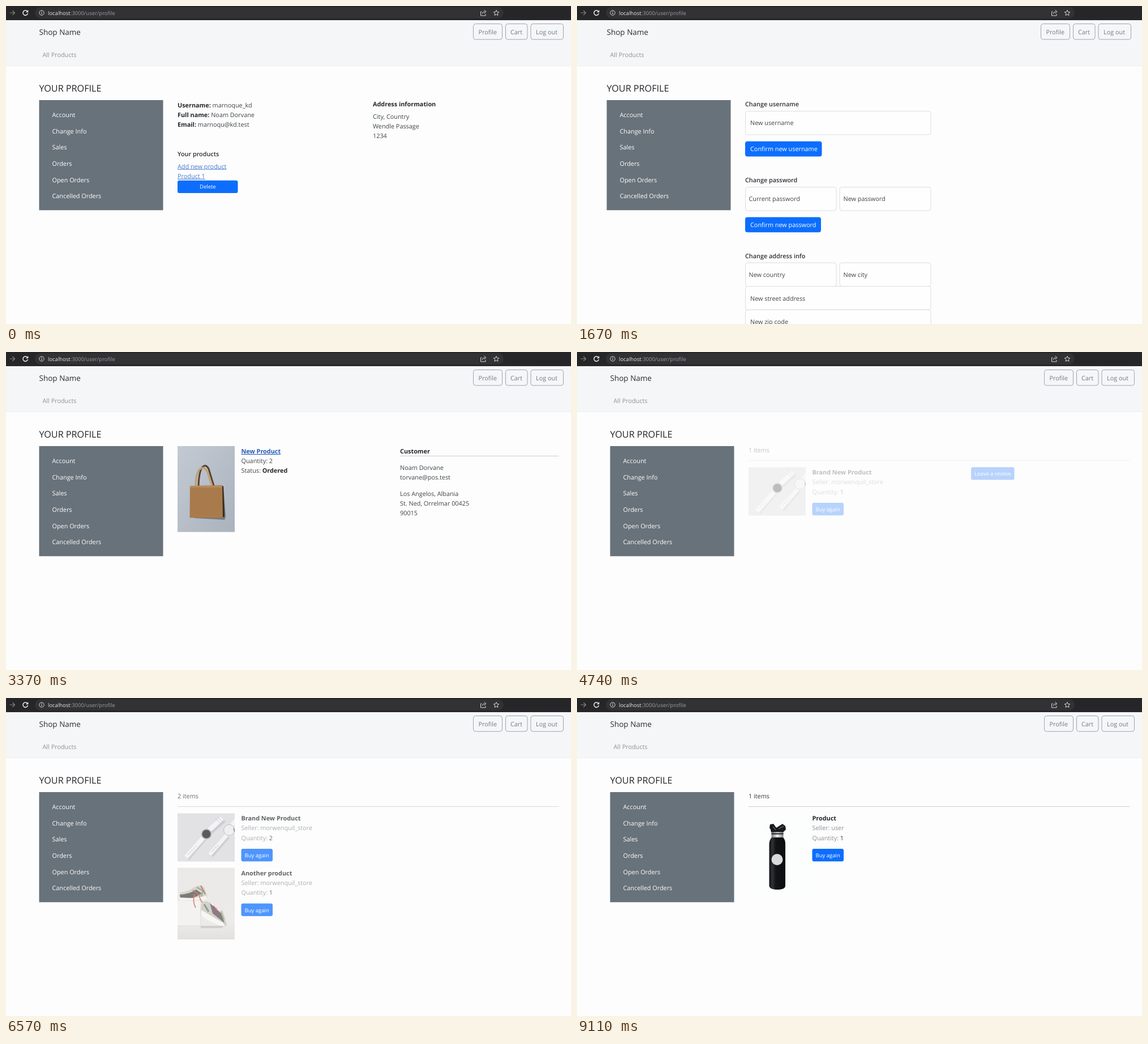
An HTML page for the animation above (9.64 s loop, 998 by 561 pixels).

```html
<!DOCTYPE html>
<html lang="en">
<head>
<meta charset="utf-8">
<title>Shop profile</title>
<style>
html, body { margin: 0; width: 100%; height: 100%; overflow: hidden; background: #fdfdfd; }
svg { display: block; width: 998px; height: 561px; }
text { font: 400 10.85px "Open Sans", "Noto Sans", sans-serif; fill: #3f4347; text-rendering: geometricPrecision; }
.bold, .bold text { font-weight: 700; fill: #24282c; }
.head { font-weight: 600; fill: #2b2f33; }
.title { font-size: 16.2px; font-weight: 500; fill: #212529; }
.brand { font-size: 13.5px; fill: #2b2d2f; }
.url { font-size: 9.47px; fill: #e6e6e6; }
.dim { fill: #9b9ca0; }
.soft { fill: #8d9195; }
.dark { fill: #33373b; }
.nav text { fill: #747a80; }
.nav rect { fill: none; stroke: #a0a4b2; }
.menu text { fill: #fff; }
.link { fill: #4a7bd0; text-decoration: underline; }
.blue { fill: #0d6efd; }
.small { font-size: 9.5px; fill: #fff; }
.big { fill: #fff; }
.field { fill: #fefefe; stroke: #dddde4; }
.rule { stroke: #cdcbd6; }
.icon { fill: none; stroke: #d8d8d8; stroke-width: 1.2; }

.page, .shift { animation: 9640ms linear infinite; }
.page { opacity: 0; }
.shift { animation-name: shift; animation-timing-function: step-end; }
.account { animation-name: account; }
.change { animation-name: change; }
.sales { animation-name: sales; }
.orders { animation-name: orders; }
.open { animation-name: open; }
.cancelled { animation-name: cancelled; }

/* the scrollbar of the long page moves the layout left */
@keyframes shift {
  0%, 30.083%, 100% { transform: none; }
  13.174% { transform: translateX(-6px); }
}
@keyframes account {
  0%, 13.172% { opacity: 1; }
  13.174%, 100% { opacity: 0; }
}
@keyframes change {
  0%, 13.172% { opacity: 0; }
  13.174% { opacity: .28; }
  14.315%, 30.081% { opacity: 1; }
  30.083%, 100% { opacity: 0; }
}
@keyframes sales {
  0%, 30.081% { opacity: 0; }
  30.083% { opacity: .28; }
  31.224%, 49.168% { opacity: 1; }
  49.17%, 100% { opacity: 0; }
}
@keyframes orders {
  0%, 49.168% { opacity: 0; }
  49.17% { opacity: .28; }
  50.311%, 67.529% { opacity: 1; }
  67.531%, 100% { opacity: 0; }
}
@keyframes open {
  0%, 67.529% { opacity: 0; }
  67.531% { opacity: .4; }
  68.672%, 83.4% { opacity: 1; }
  83.402%, 100% { opacity: 0; }
}
@keyframes cancelled {
  0%, 83.4% { opacity: 0; }
  83.402% { opacity: .28; }
  84.543%, 100% { opacity: 1; }
}
</style>
</head>
<body>
<svg viewBox="0 0 998 561">
  <defs>
    <linearGradient id="wall" x2="1" y2="1">
      <stop stop-color="#c3cad3"/><stop offset="1" stop-color="#aab2bd"/>
    </linearGradient>
    <linearGradient id="studio" x2="0" y2="1">
      <stop stop-color="#e3e1df"/><stop offset=".75" stop-color="#e6e4e2"/><stop offset="1" stop-color="#d8d6d5"/>
    </linearGradient>
    <linearGradient id="steel">
      <stop stop-color="#77797c"/><stop offset=".5" stop-color="#eceded"/><stop offset="1" stop-color="#808286"/>
    </linearGradient>
    <linearGradient id="black">
      <stop stop-color="#101113"/><stop offset=".2" stop-color="#303236"/><stop offset=".4" stop-color="#131416"/><stop offset="1" stop-color="#0b0c0d"/>
    </linearGradient>
    <clipPath id="frame"><path d="M303 203.500h101v85H303z"/></clipPath>

    <g id="watches" clip-path="url(#frame)">
      <path d="M303 203h101v86H303z" fill="#d7d6d9"/>
      <g fill="none" stroke-linecap="butt">
        <path d="M320 283L350 248M360 237L385 215" stroke="#bcbbc0" stroke-width="9"/>
        <path d="M318 281L349 246M359 233L382 212" stroke="#f0eff2" stroke-width="8"/>
        <path d="M322 276L336 261" stroke="#a9a8ae" stroke-width="1.500" stroke-dasharray="1.500 3"/>
        <path d="M370 213l10 9M374 210l9 9" stroke="#b3b2b8"/>
        <path d="M363 278L392 244" stroke="#bcbbc0" stroke-width="8"/>
        <path d="M360 276L390 242M399 224L406 216" stroke="#efeef1" stroke-width="7"/>
        <path d="M364 271L376 258" stroke="#98979d" stroke-width="1.500" stroke-dasharray="1.500 3"/>
      </g>
      <circle cx="354" cy="240" r="9.500" fill="#aaa9ae"/>
      <circle cx="354" cy="240" r="7.600" fill="#1d1e21"/>
      <circle cx="394" cy="233" r="9.500" fill="#e9e8eb" stroke="#a9a8ad"/>
      <path d="M402 230l2 6" stroke="#55555a" stroke-width="1.500"/>
    </g>

    <g id="shoes">
      <path d="M303 299.500h101V426H303z" fill="url(#studio)"/>
      <path d="M303 358h41v44h-41z" fill="#efeeec"/>
      <path d="M303 402h41v-44" fill="none" stroke="#d0cecb"/>
      <path d="M344 402h44l-8 4h-36z" fill="#bfbcb9"/>
      <path d="M306 349L308 343Q321 342 332 334Q344 328 350 334L354 345Q357 353 352 355L309 356Z" fill="#c9c5b5"/>
      <path d="M307 347Q324 346 336 338L346 345L330 353L308 352Z" fill="#4b4a43"/>
      <path d="M306 352Q330 355 354 349L354 355L309 357Z" fill="#f4f2ee"/>
      <path d="M337 334l11 6l-3 10" fill="none" stroke="#7d9a80" stroke-width="3"/>
      <path d="M330 339l12 9M344 331l8 15" stroke="#a94f58" stroke-width="2"/>
      <path d="M333 346Q329 359 335 370M341 346Q343 361 351 363Q362 365 373 372" fill="none" stroke="#d55443" stroke-width="1.600"/>
      <path d="M346 361Q355 355 362 363L378 377Q381 372 383 376L390 399Q389 404 382 402L346 383Q342 374 346 361Z" fill="#c5c1b4"/>
      <path d="M360 362L380 380L386 397L365 380Z" fill="#55505a"/>
      <path d="M345 374L384 397L387 403Q366 400 345 384Z" fill="#f5f3ef"/>
      <path d="M350 364l8 13" stroke="#5f7c68" stroke-width="3"/>
      <path d="M366 367l10 17" stroke="#8e3850" stroke-width="3"/>
      <path d="M380 377l5 14" stroke="#83a46c" stroke-width="2"/>
    </g>

    <g id="again">
      <rect class="blue" x="415.500" y="266" width="55.500" height="22.300" rx="3"/>
      <text class="small" x="421.500" y="281.300">Buy again</text>
    </g>
  </defs>

  <path d="M0 0h998v561H0z" fill="#fdfdfd"/>

  <path d="M0 0h998v25H0z" fill="#262628"/>
  <rect x="51" y="2" width="828" height="20" rx="10" fill="#323235"/>
  <path class="icon" d="M6.500 12h9M11.500 8l4 4l-4 4" style="stroke:#85857a"/>
  <path class="icon" d="M37.600 9.300A4.300 4.300 0 1 0 38.500 13" style="stroke:#eee;stroke-width:1.500"/>
  <path d="M39.300 7v4.300H35z" fill="#eee"/>
  <circle class="icon" cx="63" cy="12" r="4.200" style="stroke-width:1"/>
  <path class="icon" d="M63 11.500v2.800M63 9.300v1.100"/>
  <text class="url" x="74" y="15.500">localhost<tspan class="dim">:3000/user/profile</tspan></text>
  <path class="icon" d="M840.500 10h-2v7h8.500v-3M841 14q.5-4 5-4M844.500 7l3.500 3l-3.500 3" style="stroke-width:1"/>
  <path class="icon" d="M866 7.300l1.400 3.200l3.400.3l-2.600 2.300l.8 3.400l-3-1.800l-3 1.800l.8-3.400l-2.600-2.300l3.400-.3z" style="stroke-width:1"/>

  <path d="M0 25h998v80H0z" fill="#f5f6f7"/>
  <path d="M0 105.500h998" stroke="#ededee"/>

  <g class="shift">
    <text class="brand" x="58.500" y="51">Shop Name</text>
    <text class="soft" x="64.500" y="90">All Products</text>
    <g class="nav">
      <rect x="825.500" y="31.500" width="51" height="27.500" rx="4"/>
      <rect x="882.500" y="31.500" width="38.500" height="27.500" rx="4"/>
      <rect x="927" y="31.500" width="57.500" height="27.500" rx="4"/>
      <text x="834.500" y="50">Profile</text>
      <text x="891" y="50">Cart</text>
      <text x="936" y="50">Log out</text>
    </g>
    <text class="title" x="58.500" y="151">YOUR PROFILE</text>
    <g class="menu">
      <path d="M58.500 166h219v194.300h-219z" fill="#68727a"/>
      <text x="81.500" y="196">Account</text>
      <text x="81.500" y="224.700">Change Info</text>
      <text x="81.500" y="253.300">Sales</text>
      <text x="81.500" y="282">Orders</text>
      <text x="81.500" y="310.600">Open Orders</text>
      <text x="81.500" y="339.200">Cancelled Orders</text>
    </g>
  </g>

  <g class="page account">
    <text x="303" y="179"><tspan class="bold">Username:</tspan> marnoque_kd</text>
    <text x="303" y="196.200"><tspan class="bold">Full name:</tspan> Noam Dorvane</text>
    <text x="303" y="213.400"><tspan class="bold">Email:</tspan> marnoqu@kd.test</text>
    <text class="head" x="303" y="265.200">Your products</text>
    <text class="link" x="303" y="286.600">Add new product</text>
    <text class="link" x="303" y="303.800">Product 1</text>
    <rect class="blue" x="303" y="307.700" width="106.500" height="22.300" rx="3"/>
    <text class="small" x="342" y="322.400">Delete</text>
    <text class="bold" x="648" y="177.300">Address information</text>
    <text x="648" y="198.700">City, Country</text>
    <text x="648" y="215.900">Wendle Passage</text>
    <text x="648" y="233.100">1234</text>
  </g>

  <g class="page change">
    <text class="head" x="297" y="177.300">Change username</text>
    <rect class="field" x="297.500" y="185.500" width="327.500" height="41.500" rx="4"/>
    <text x="306" y="210.400">New username</text>
    <rect class="blue" x="297" y="238.700" width="135.500" height="26.800" rx="4"/>
    <text class="big" x="306" y="256.200">Confirm new username</text>

    <text class="head" x="297" y="311.200">Change password</text>
    <rect class="field" x="297.500" y="319.500" width="160.500" height="41.500" rx="4"/>
    <rect class="field" x="464" y="319.500" width="161" height="41.500" rx="4"/>
    <text x="303.500" y="344.200">Current password</text>
    <text x="470.500" y="344.200">New password</text>
    <rect class="blue" x="297" y="372.500" width="134" height="26.800" rx="4"/>
    <text class="big" x="306" y="390">Confirm new password</text>

    <text class="head" x="297" y="445">Change address info</text>
    <rect class="field" x="297.500" y="453" width="160.500" height="41.500" rx="4"/>
    <rect class="field" x="464" y="453" width="161" height="41.500" rx="4"/>
    <rect class="field" x="297.500" y="494.500" width="327.500" height="41.500" rx="4"/>
    <rect class="field" x="297.500" y="536" width="327.500" height="41.500" rx="4"/>
    <text x="303.500" y="478.200">New country</text>
    <text x="470.500" y="478.200">New city</text>
    <text x="306" y="519.800">New street address</text>
    <text x="306" y="561">New zip code</text>
  </g>

  <g class="page sales">
    <path d="M303 166h101v151.500H303z" fill="url(#wall)"/>
    <path d="M332 293L386 296L388 291L384 236z" fill="#77797d"/>
    <path d="M340 236Q341 210 347 203Q353 197 358 206L367 236" fill="none" stroke="#54432f" stroke-width="3"/>
    <path d="M335 236Q336 213 342 207Q350 200 356 212L364 236" fill="none" stroke="#c0a178" stroke-width="3.500"/>
    <path d="M380 235L384 237L386 290L381 293z" fill="#33291f"/>
    <path d="M325 236L382 235L383 292.500L324.500 292.500z" fill="#a97b4c"/>
    <path d="M325 236h57v3h-57z" fill="#b98c5d"/>
    <text class="link bold" x="415.500" y="179" style="fill:#2257b8">New Product</text>
    <text x="415.500" y="196.200">Quantity: 2</text>
    <text x="415.500" y="213.400">Status: <tspan class="bold">Ordered</tspan></text>
    <text class="bold" x="696" y="179">Customer</text>
    <path class="rule" d="M696 183.500h280.500"/>
    <text x="696" y="208">Noam Dorvane</text>
    <text x="696" y="225.200">torvane@pos.test</text>
    <text x="696" y="254">Los Angelos, Albania</text>
    <text x="696" y="271.200">St. Ned, Orrelmar 00425</text>
    <text x="696" y="288.400">90015</text>
  </g>

  <g class="page orders">
    <text class="dark" x="303" y="177.300">1 items</text>
    <path class="rule" d="M303 191.500h673.500"/>
    <use href="#watches"/>
    <text class="bold" x="415.500" y="216.200">Brand New Product</text>
    <text class="soft" x="415.500" y="233.400">Seller: morwenquil_store</text>
    <text class="soft" x="415.500" y="250.600">Quantity: <tspan class="dark">1</tspan></text>
    <use href="#again"/>
    <rect class="blue" x="696" y="203.300" width="76.500" height="22.300" rx="3"/>
    <text class="small" x="702" y="218.400">Leave a review</text>
  </g>

  <g class="page open">
    <text class="dark" x="303" y="177.300">2 items</text>
    <path class="rule" d="M303 191.500h673.500"/>
    <use href="#watches"/>
    <text class="bold" x="415.500" y="216.200">Brand New Product</text>
    <text class="soft" x="415.500" y="233.400">Seller: morwenquil_store</text>
    <text class="soft" x="415.500" y="250.600">Quantity: <tspan class="dark">2</tspan></text>
    <use href="#again"/>
    <use href="#shoes"/>
    <text class="bold" x="415.500" y="312.800">Another product</text>
    <text class="soft" x="415.500" y="330">Seller: morwenquil_store</text>
    <text class="soft" x="415.500" y="347.200">Quantity: <tspan class="dark">1</tspan></text>
    <use href="#again" y="96.500"/>
  </g>

  <g class="page cancelled">
    <text class="dark" x="303" y="177.300">1 items</text>
    <path class="rule" d="M303 191.500h673.500"/>
    <path d="M303 203.500h101v151H303z" fill="#fcfdfd"/>
    <path d="M343 237L342 232L340 229L341 223L347 222L352 229L363 222L368 226L369 232L364 237z" fill="#17181a"/>
    <path d="M346 227l5 6M356 231l9-5" stroke="#55585c" stroke-width="1.500"/>
    <path d="M343.500 236.500h21v10h-21z" fill="url(#steel)"/>
    <path d="M343.500 239.500h21" stroke="#1c1d1f" stroke-width="2"/>
    <path d="M344 246h20Q368 250 368 257V331Q368 338 354 338T339.500 331V257Q340 250 344 246z" fill="url(#black)"/>
    <circle cx="353.500" cy="285" r="10" fill="#d9dadb"/>
    <text class="bold" x="415.500" y="216.200">Product</text>
    <text class="soft" x="415.500" y="233.400">Seller: user</text>
    <text class="soft" x="415.500" y="250.600">Quantity: <tspan class="dark">1</tspan></text>
    <use href="#again"/>
  </g>
</svg>
</body>
</html>
```
